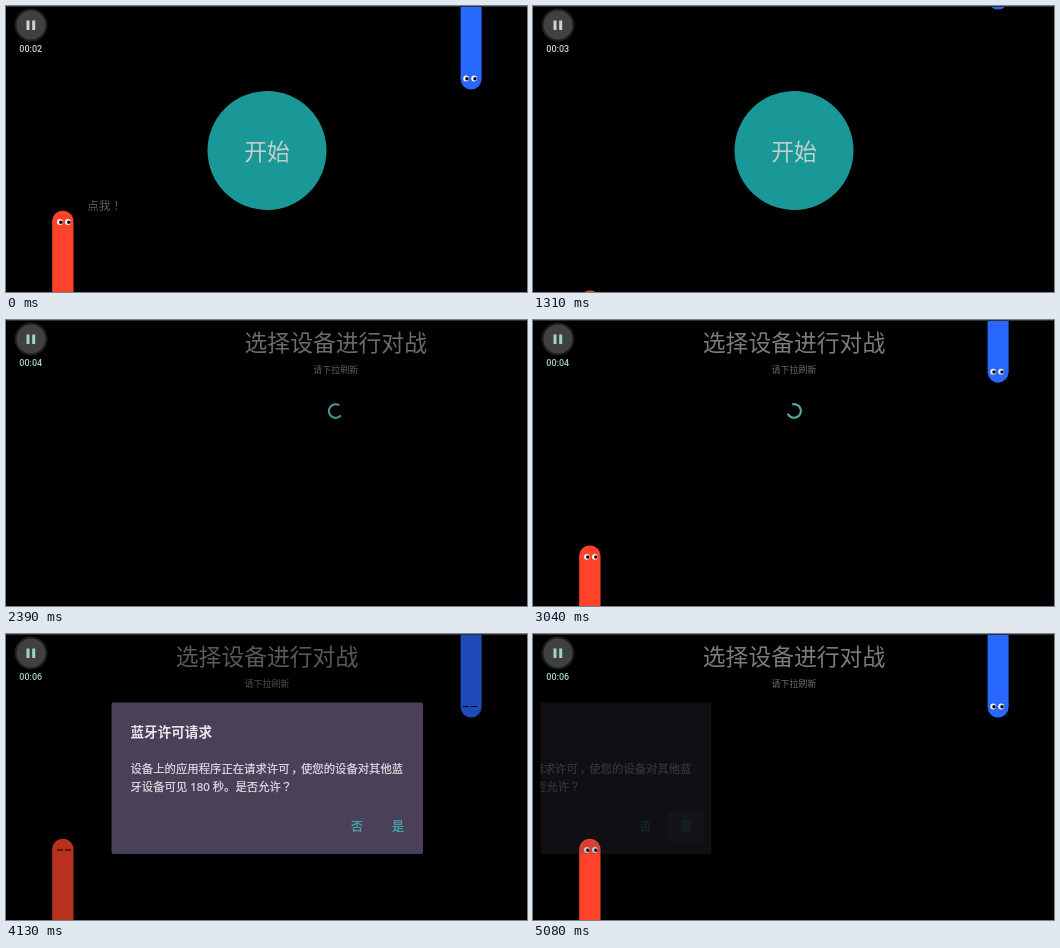
These frames come from a looping animation (521x286 px, 5.14 s). An HTML page:

```html
<!DOCTYPE html>
<html lang="zh-CN">
<head>
<meta charset="utf-8">
<style>
  html, body { margin: 0; width: 100%; height: 100%; overflow: hidden; background: #000; }
  svg { display: block; width: 100%; height: 100%; font-family: "Noto Sans CJK SC", "Noto Sans CJK", sans-serif; }
  .mid { text-anchor: middle; }
  .wide { font-family: "Noto Sans CJK JP", "Noto Sans CJK", sans-serif; }
  #dialog { font-family: "Noto Sans", "Noto Sans CJK SC", "Noto Sans CJK", sans-serif; }
  #clock { font: 500 9px Roboto, sans-serif; }
</style>
</head>
<body>
<svg viewBox="0 0 521 286">
  <defs>
    <clipPath id="window"><rect x="7.5" width="514" height="286"/></clipPath>
    <g id="eyesOpen">
      <circle cx="-3.3" r="2.9" fill="#f4f4f4"/><circle cx="4.7" r="2.9" fill="#f4f4f4"/>
      <circle cx="-2.4" cy=".2" r="1.7"/><circle cx="5.6" cy=".2" r="1.7"/>
    </g>
    <path id="eyesShut" d="M-6.3 0h6M1.7 0h6" stroke="#000" stroke-width="1.2"/>
  </defs>

  <text id="hint" x="81" y="204" font-size="11.8" fill="#5c5c5c">点我<tspan class="wide" lang="ja">！</tspan></text>

  <g id="start">
    <circle cx="261" cy="144.5" r="59.5" fill="#1a9797"/>
    <text class="mid" x="261" y="153.5" font-size="22.8" fill="#c3cfcf">开始</text>
  </g>

  <g id="page">
    <text class="mid" x="261" y="31" font-size="22.8" fill="#7b7b7b">选择设备进行对战</text>
    <text class="mid" x="261" y="52.8" font-size="9" fill="#6c6c6c">请下拉刷新</text>
    <path id="spinner" d="M3.6 -5.7A6.8 6.8 0 1 0 5.2 4.4" fill="none" stroke="#55a7a3" stroke-width="2.1"/>
  </g>

  <g id="red">
    <path d="M46.2 300V215.3a10.65 10.65 0 0 1 21.3 0V300z" fill="#ff432a"/>
    <g class="eyes" transform="translate(57.2 216)"><use href="#eyesOpen"/><use href="#eyesShut"/></g>
  </g>
  <g id="blue">
    <path d="M454.6 -14V73a10.5 10.5 0 0 0 21 0V-14z" fill="#2968ff"/>
    <g class="eyes" transform="translate(463.4 72.5)"><use href="#eyesOpen"/><use href="#eyesShut"/></g>
  </g>

  <rect id="dim" width="521" height="286"/>

  <g clip-path="url(#window)">
    <g id="dialog">
      <rect x="105.5" y="68.5" width="311.5" height="151.5" rx="2" fill="#4a4158"/>
      <rect id="press" x="374" y="178" width="35" height="30" rx="3" fill="#fff"/>
      <text x="124.5" y="102.8" font-size="13.6" font-weight="bold" fill="#e8e5ec">蓝牙许可请求</text>
      <g font-size="11.37" fill="#e4e1e8" stroke="#e4e1e8" stroke-width=".2">
        <text x="124.5" y="139">设备上的应用程序正在请求许可<tspan dx="2">，</tspan><tspan dx="-2">使</tspan>您的设备对其他蓝</text>
        <text x="124.5" y="156.8">牙设备可见 180 秒。是否允许<tspan class="wide" lang="ja">？</tspan></text>
      </g>
      <g class="mid" font-size="12" fill="#4bacb4" stroke="#4bacb4" stroke-width=".25">
        <text x="351" y="197.4">否</text>
        <text x="392" y="197.4">是</text>
      </g>
    </g>
  </g>

  <rect width="521" height="1" fill="#303030"/>
  <circle cx="25" cy="19" r="16.5" fill="#1d1d1d"/>
  <circle cx="25" cy="19" r="14.5" fill="#3e4140"/>
  <g id="overlay">
    <path d="M20.5 14.5h3v9.5h-3zM26.2 14.5h3v9.5h-3z"/>
    <text id="clock" class="mid" x="24.8" y="46"></text>
  </g>
</svg>
<script>
const LOOP = 5140;
const $ = id => document.getElementById(id);
const eyes = document.querySelectorAll('.eyes');

const ramp = (t, a, b) => Math.min(1, Math.max(0, (t - a) / (b - a)));
const ease = (t, a, b) => (1 - Math.cos(Math.PI * ramp(t, a, b))) / 2;
const out = x => 1 - (1 - x) ** 2;
const move = (id, x, y = 0) => $(id).setAttribute('transform', `translate(${x} ${y})`);
const fade = (id, a) => $(id).setAttribute('opacity', a);

function draw(t) {
  fade('hint', 1 - ramp(t, 380, 800));

  // snakes pull back, then return on the next page
  const hidden = 84 * (ease(t, 650, 1420) - ease(t, 2640, 3240));
  move('red', 0, hidden);
  move('blue', 0, -hidden);
  const shut = t >= 4110 && t < 4230;
  for (const e of eyes) {
    e.children[0].setAttribute('opacity', shut ? 0 : 1);
    e.children[1].setAttribute('opacity', shut ? 1 : 0);
  }

  // page change
  move('start', -195 * ease(t, 1544, 2244));
  fade('start', 1 - ramp(t, 1910, 2244));
  const enter = ease(t, 2010, 2650);
  move('page', 195 * (1 - enter));
  fade('page', Math.min(1, enter * 1.35));
  $('spinner').setAttribute('transform', `translate(261 91) rotate(${(t - 2390) * 0.33})`);
  fade('spinner', t < 3560 ? 1 : 0);

  // dialog
  const leave = ease(t, 4740, 5140);
  fade('dim', 0.28 * (out(ramp(t, 3210, 3450)) - ramp(t, 4700, 4960)));
  move('dialog', -252 * leave);
  fade('dialog', ramp(t, 3230, 3360) * (1 - 0.81 * leave));
  fade('press', 0.1 * ramp(t, 4450, 4650));

  const seconds = 2 + [930, 2080, 3230, 3810].filter(s => t >= s).length;
  $('clock').textContent = '00:0' + seconds;
  $('overlay').setAttribute('fill', t < 1500 ? '#cfd3d3' : '#a3d0d0');
}

const begin = performance.now();
function tick() {
  draw((performance.now() - begin) % LOOP);
  requestAnimationFrame(tick);
}
tick();
</script>
</body>
</html>
```
